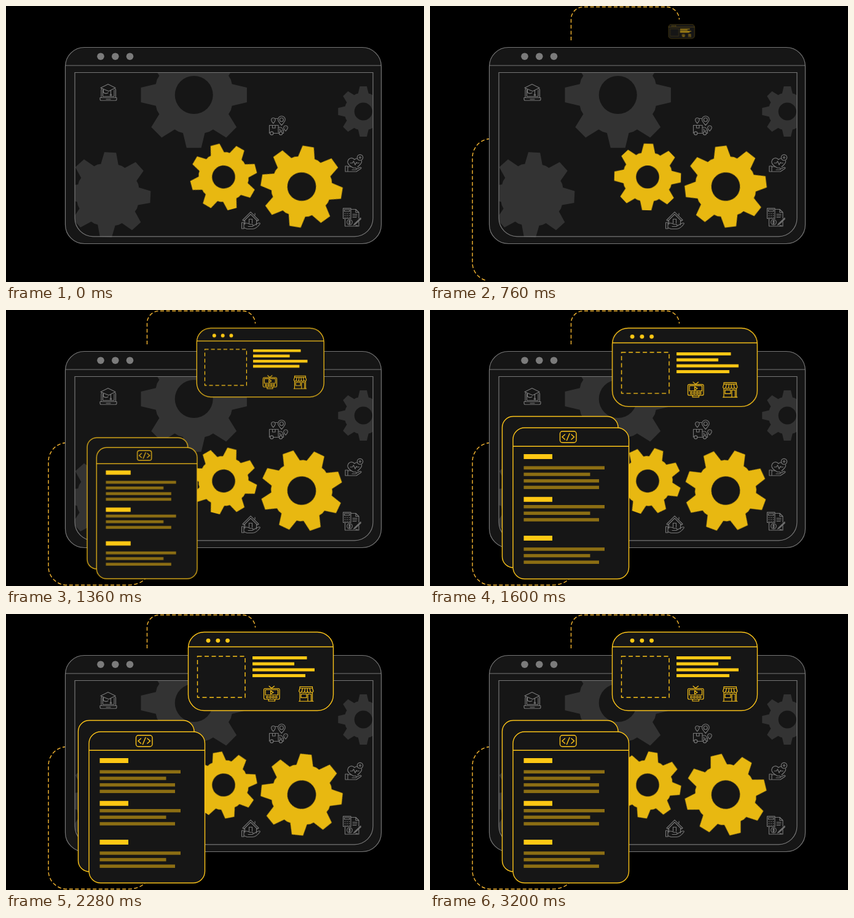
Animation, 680 px wide and 450 px high, one loop 3240 ms. Source, as an HTML page:

```html
<!DOCTYPE html>
<html lang="en">
<head>
<meta charset="utf-8">
<title>Gears and windows</title>
<style>
html, body { margin: 0; width: 100%; height: 100%; overflow: hidden; background: #000; }
svg { display: block; width: 680px; height: 450px; fill: none; }
.panel { fill: #161616; }
.gray { stroke: #777; stroke-width: 1.2; }
.gold { stroke: #fcc419; stroke-width: 1.4; }
.icon { stroke-width: 1.15; stroke-linecap: round; stroke-linejoin: round; }
.fill { fill: #ffc814; stroke: none; }
.dim { fill: #8c6e13; stroke: none; }
.cog { fill: #333; }
.yellow { fill: #e8b811; }
.trail { stroke: #f9b932; stroke-width: 1.4; stroke-dasharray: 6 3.6; }
.reveal { stroke: #fff; stroke-width: 6; stroke-dasharray: 1 2; }

.spin, .pop, .reveal { animation: 3.24s linear infinite; }
.small { transform-origin: 354px 278.8px; animation-name: small; }
.large { transform-origin: 481px 294.5px; animation-name: large; }
.card { transform-origin: 408px 30px; animation-name: card; }
.page { transform-origin: 228px 436px; animation-name: page; }
.top { animation-name: top; }
.left { animation-name: left; }

@keyframes small { from { transform: rotate(-14.9deg); } to { transform: rotate(55.1deg); } }
@keyframes large { from { transform: rotate(9.3deg); } to { transform: rotate(-59.4deg); } }
@keyframes card {
  0%, 13.67% { transform: scale(0); animation-timing-function: cubic-bezier(.333, 0, .667, 1); }
  49.97%, 100% { transform: none; }
}
@keyframes page {
  0%, 29.01% { transform: scale(0); animation-timing-function: cubic-bezier(.333, 0, .667, 1); }
  45.83%, 100% { transform: none; }
}
@keyframes top {
  0% { stroke-dashoffset: 1; animation-timing-function: cubic-bezier(.333, 0, .667, 1); }
  14.81%, 100% { stroke-dashoffset: 0; }
}
@keyframes left {
  0% { stroke-dashoffset: 1; animation-timing-function: cubic-bezier(.333, .158, .667, .527); }
  32.1%, 100% { stroke-dashoffset: 0; }
}
</style>
</head>
<body>
<svg viewBox="0 0 680 450">
  <defs>
    <path id="topLine" pathLength="1" d="M229.5 56V22A20 20 0 0 1 249.5 1.5H384A21 21 0 0 1 405.5 22"/>
    <path id="leftLine" pathLength="1" d="M98 216.5A29.5 31 0 0 0 69 247V418A30 30 0 0 0 99 448.5H198Q219 448.5 229 435"/>
    <mask id="topMask" maskUnits="userSpaceOnUse" x="0" y="0" width="680" height="450">
      <path class="reveal top" pathLength="1" d="M229.5 56V22A20 20 0 0 1 249.5 1.5H384A21 21 0 0 1 405.5 22"/>
    </mask>
    <mask id="leftMask" maskUnits="userSpaceOnUse" x="0" y="0" width="680" height="450">
      <path class="reveal left" pathLength="1" d="M98 216.5A29.5 31 0 0 0 69 247V418A30 30 0 0 0 99 448.5H198Q219 448.5 229 435"/>
    </mask>
    <clipPath id="inside"><path d="M112 109H596.5V378H112Z"/></clipPath>
  </defs>

  <path class="trail" mask="url(#topMask)" d="M229.5 56V22A20 20 0 0 1 249.5 1.5H384A21 21 0 0 1 405.5 22"/>
  <path class="trail" mask="url(#leftMask)" d="M98 216.5A29.5 31 0 0 0 69 247V418A30 30 0 0 0 99 448.5H198Q219 448.5 229 435"/>

  <!-- main window -->
  <rect class="panel gray" x="96.5" y="67.5" width="514" height="320" rx="31"/>
  <path class="gray" d="M96.5 97H610.5"/>
  <g fill="#7b7b7b"><circle cx="154" cy="82.2" r="5.8"/><circle cx="177.8" cy="82.2" r="5.8"/><circle cx="201.5" cy="82.2" r="5.8"/></g>
  <g clip-path="url(#inside)">
    <path class="cog" data-gear="305.7 145 87 31"/>
    <path class="cog" data-gear="166 307.7 69.7 0" transform="rotate(3 166 307.7)"/>
    <path class="cog" data-gear="581.3 172 41.4 14.6"/>
  </g>
  <path class="gray" d="M112 108.5H597V346A30 30 0 0 1 567 375.8H142A30 30 0 0 1 112 346Z"/>

  <!-- gray icons -->
  <g class="gray icon">
    <path d="M155 149.500V136.500Q155 135 156.500 135M177 135Q178.500 135 178.500 136.500V149.500M153 149.500H180V152Q180 154 178 154H155Q153 154 153 152ZM163 152H170M157.500 137V147.500H176V137"/>
    <path d="M154 133.500L166 127.500L178 133.500L167 139ZM158.500 136V141Q162 144 166 141.500M170.500 137.500V144M169.500 144H171.500V146H169.500Z"/>
  </g>
  <g class="gray icon">
    <path d="M428.500 206V194.500H443V206M433.500 194.500V199H438V194.500M428 207H429.500M435 207.500H444M443 198H448L451.500 202.500V207.500H450M445.500 200.500V203H450"/>
    <circle cx="432.300" cy="207.500" r="2.600"/><circle cx="447" cy="207.500" r="2.600"/>
    <path d="M448.300 194.500Q442.500 188 442.500 185.300A5.800 5.800 0 0 1 454.200 185.300Q454.200 188 448.300 194.500ZM434.800 191.500Q431.500 187.500 431.500 185.800A3.300 3.300 0 0 1 438.100 185.800Q438.100 187.500 434.800 191.500ZM455 204Q451.700 200 451.700 198.500A3.300 3.300 0 0 1 458.300 198.500Q458.300 200 455 204Z"/>
    <circle cx="448.300" cy="185.500" r="3"/><path d="M438.500 183.500H441.500M434.800 185.700H434.900M455 198.500H455.100"/>
  </g>
  <g class="gray icon">
    <path d="M571.500 249Q569 248 567 250.500Q563 246 558 249.500Q553.500 254 558 259L562 262.500M572 262.500L576.500 258Q579 255.500 578.500 252.500M560 256H563.500L565.500 253L568 259L570 255L571 256H574.500"/>
    <circle cx="576" cy="247" r="4.700"/><path d="M574 247H578M576 245V249"/>
    <path d="M552 261H556V270H552ZM556 262.500Q561 260.500 565 264H569Q571.500 266 569 267H563M571 265.500L576 263Q579 263 577.500 265L570 270H556"/>
  </g>
  <g class="gray icon">
    <path d="M385 349L398 335.800L411 349L409 350.500L398 339.500L387 350.500ZM388.500 350V356M407.500 350V357M395.500 354V347.500H400.500V354M405 338V341"/>
    <path d="M383.500 353H387V363H383.500ZM387 355Q392 352.500 397 356H401Q403.500 358.500 400.500 359.500H394M403 358L409 354.500Q414 352.500 413 355.500Q407 363.500 401 363.500H392L387 361.500"/>
  </g>
  <g class="gray icon">
    <path d="M548.500 329.800H561V346.500H548.500ZM550.500 332H559V335H550.500ZM551 338.500H552M554.500 338.500H555.500M558 338.500H559M551 341.500H552M554.500 341.500H555.500M558 341.500H559M551 344.500H552M554.500 344.500H555.500M558 344.500H559"/>
    <path d="M561 331.500H569L574 336.500V346M569 331.500V336.500H574M564 339.500H571M564 342H571M564 344.500H570M551.500 346.500V359H574V351.500M577 345.500L567 355L565.500 357L568 356L577.500 347M569 358H572"/>
    <circle cx="559" cy="352.500" r="4.300"/><path d="M560.500 351Q559 349.500 557.800 351Q558 352.300 559 352.500Q560.500 353 560.200 354Q559 355.500 557.500 354M559 349.500V355.500"/>
  </g>

  <g class="spin small"><path class="yellow" data-gear="354 278.8 54.7 18.8"/></g>
  <g class="spin large"><path class="yellow" data-gear="481 294.5 66.9 23.3"/></g>

  <!-- browser card -->
  <g class="pop card gold">
    <rect class="panel" x="296.500" y="29.500" width="236" height="128" rx="26"/>
    <path d="M296.500 53.500H532.500"/>
    <g class="fill"><circle cx="329" cy="43.300" r="3.400"/><circle cx="344.800" cy="43.300" r="3.400"/><circle cx="360.500" cy="43.300" r="3.400"/></g>
    <rect x="311.500" y="69" width="77.500" height="67" stroke-dasharray="7 4.500"/>
    <path class="fill" d="M401 69h88.500v5H401ZM401 78.800h68v5h-68ZM401 88.500h101v5H401ZM401 98h86v5h-86Z"/>
    <g class="icon">
      <rect x="419.500" y="121.500" width="25.500" height="17.500" rx="2"/>
      <rect x="422" y="123.500" width="20.500" height="8.500"/>
      <path d="M428 117.500L432 121L436.500 117.500M430.500 125V130.500L435 127.800ZM427 139V142H437.500V139"/>
      <circle cx="425" cy="135.500" r="1.500"/><circle cx="430" cy="135.500" r="1.500"/><circle cx="434.800" cy="135.500" r="1.500"/><circle cx="439.500" cy="135.500" r="1.500"/>
    </g>
    <g class="icon">
      <path d="M478 118.500H498.500V121L500 126Q498 129.500 495.300 127Q493 129.500 490.500 127Q488 129.500 485.700 127Q483 129.500 481 127Q478.500 129.500 476.500 126L478 121ZM478 121H498.500M482.500 121L481 127M486.500 121L485.700 127M490 121L490.500 127M494 121L495.300 127M478 128.500V142M498.500 128.500V142M476.500 142.200H500M480 130.500H489V136.500H480ZM491 142V130.500H496.500V142"/>
    </g>
  </g>

  <!-- code pages -->
  <g class="pop page gold">
    <rect class="panel" x="117.500" y="173.500" width="188.500" height="246.500" rx="18"/>
    <rect class="panel" x="135" y="192" width="188.500" height="246.500" rx="19"/>
    <path d="M135 222.300H323.500"/>
    <rect x="211.500" y="197.800" width="26.500" height="18.500" rx="4"/>
    <path d="M219.500 203L215 207L219.500 211M230 203L234.500 207L230 211M227 201.500L222.500 212.500" stroke-linecap="round"/>
    <path class="fill" d="M152.500 235h46.500v8h-46.500ZM152.500 304.800h46.500v8h-46.500ZM152.500 368h46.500v8h-46.500Z"/>
    <g id="lines"></g>
  </g>
</svg>
<script>
const point = (cx, cy, r, deg) => {
  const a = deg * Math.PI / 180;
  return `${(cx + r * Math.sin(a)).toFixed(2)} ${(cy - r * Math.cos(a)).toFixed(2)}`;
};

// Eight tapered teeth around a round hub, with an optional hole.
function gear(cx, cy, r, hole) {
  const hub = r * 0.74, corners = [];
  for (let a = 0; a < 360; a += 45) {
    corners.push(point(cx, cy, hub, a - 16), point(cx, cy, r, a - 7.9),
      point(cx, cy, r, a + 7.9), point(cx, cy, hub, a + 16), point(cx, cy, hub * 1.01, a + 22.5));
  }
  const ring = hole ? `M${cx - hole} ${cy}a${hole} ${hole} 0 1 0 ${2 * hole} 0a${hole} ${hole} 0 1 0 ${-2 * hole} 0Z` : '';
  return `M${corners.join('L')}Z${ring}`;
}

for (const el of document.querySelectorAll('[data-gear]')) {
  el.setAttribute('d', gear(...el.dataset.gear.split(' ').map(Number)));
  el.setAttribute('fill-rule', 'evenodd');
}

// Text bars on the front page: block top and bar widths.
const blocks = [[254.6, [131.5, 108, 122.5, 122.5]], [318, [131.5, 108, 122.5]], [387.2, [131.5, 108, 122.5]]];
document.getElementById('lines').innerHTML = blocks.map(([y, widths]) =>
  widths.map((w, i) => `<rect class="dim" x="152.5" y="${y + i * 10.65}" width="${w}" height="5.4"/>`).join('')).join('');
</script>
</body>
</html>
```
